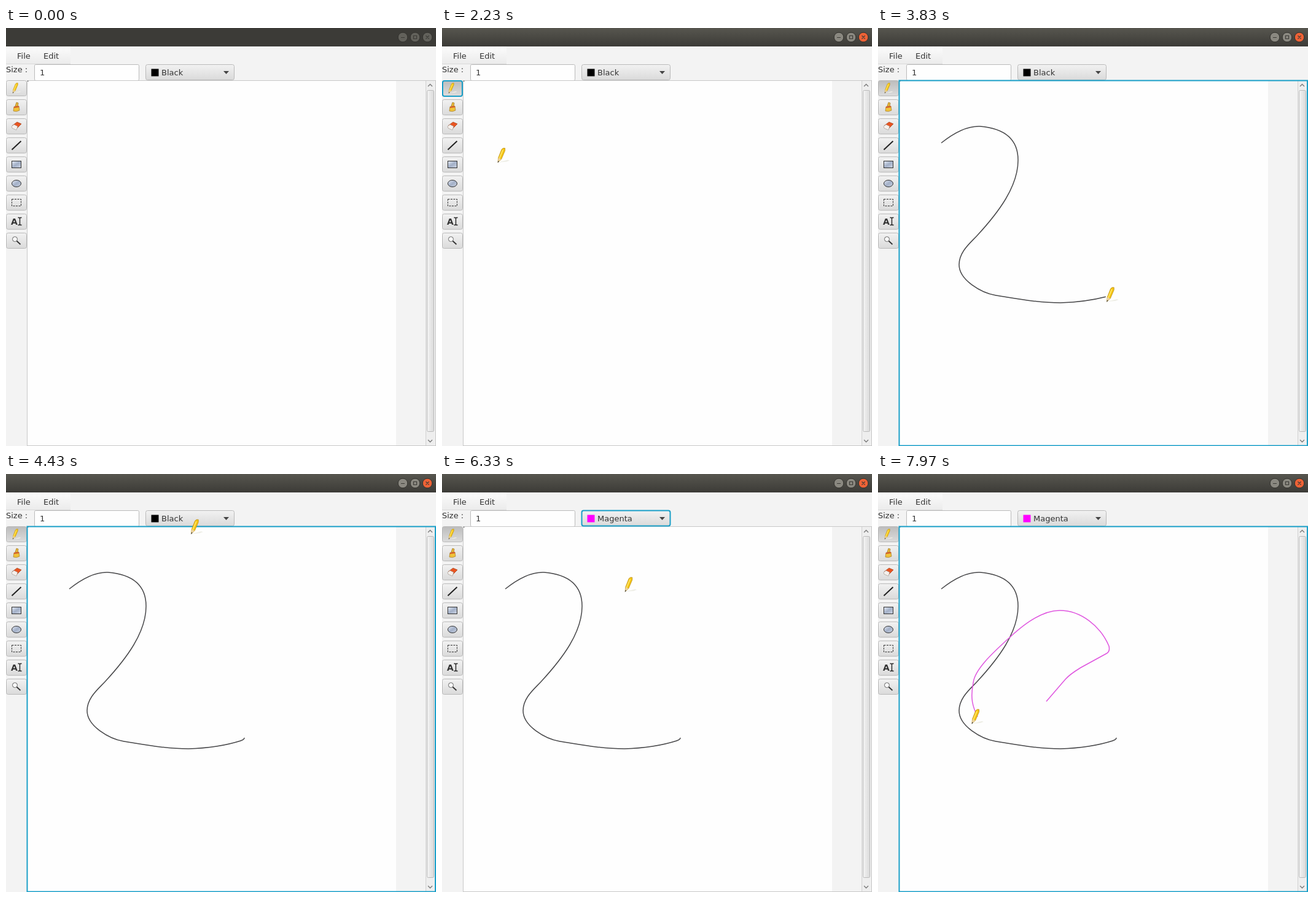
Recreate the animation shown at these times as an HTML page. Size 700 px wide and 680 px high, loop 8000 ms.

```html
<!DOCTYPE html>
<html lang="en">
<head>
<meta charset="utf-8">
<title>Paint window</title>
<style>
  html, body { margin: 0; width: 100%; height: 100%; overflow: hidden; background: #f3f3f3; }
  svg { display: block; width: 700px; height: 680px; }
  text { font: 13px "DejaVu Sans", sans-serif; fill: #333; }
  .edge { stroke: #bababa; }
  .ring { fill: none; stroke: #1a9fc8; stroke-width: 2; }
  .line { fill: none; stroke-width: 1.5; }
  .chrome circle { fill: #62615b; stroke: #33322e; }
  .chrome path { fill: none; stroke: #3c3b37; stroke-width: 1.2; }
  .active circle { fill: #8a8880; }
  .active .close { fill: #ee6236; }
</style>
</head>
<body>
<svg viewBox="0 0 700 680">
  <defs>
    <linearGradient id="titleOn" x2="0" y2="1"><stop stop-color="#57564f"/><stop offset="1" stop-color="#3c3b37"/></linearGradient>
    <linearGradient id="menu" x2="0" y2="1"><stop stop-color="#fbfbfb"/><stop offset="1" stop-color="#ebebeb"/></linearGradient>
    <linearGradient id="button" x2="0" y2="1"><stop stop-color="#f2f2f2"/><stop offset="1" stop-color="#dadada"/></linearGradient>
    <linearGradient id="hover" x2="0" y2="1"><stop stop-color="#fbfbfb"/><stop offset="1" stop-color="#e8e8e8"/></linearGradient>
    <linearGradient id="pressed" x2="0" y2="1"><stop stop-color="#bcbcbc"/><stop offset="1" stop-color="#dcdcdc"/></linearGradient>
    <linearGradient id="panel" x2="0" y2="1"><stop stop-color="#f6f6f6"/><stop offset=".8" stop-color="#efefef"/><stop offset="1" stop-color="#dcdcdc"/></linearGradient>
    <linearGradient id="thumb"><stop stop-color="#f4f4f4"/><stop offset="1" stop-color="#dadada"/></linearGradient>
    <linearGradient id="steel" x2="1" y2="1"><stop stop-color="#e4eaf4"/><stop offset=".5" stop-color="#a3b0c8"/><stop offset="1" stop-color="#ccd4e2"/></linearGradient>
    <filter id="shadow" x="-20%" y="-20%" width="140%" height="140%"><feDropShadow dx="0" dy="3" stdDeviation="5" flood-opacity=".4"/></filter>
    <g id="pencil">
      <path d="M-8 11L7 7L10 8L5 10Z" fill="#eeeee6"/>
      <path d="M-3-10Q-1-13 2.500-12V-8L-3.500 6L-9 11L-8.500 4Z" fill="#f6c614" stroke="#b98c16" stroke-width=".8"/>
      <path d="M-1-9L-7 5" stroke="#ffe66a" stroke-width="1.600"/>
      <path d="M-8.500 4L-3.500 6L-9 11Z" fill="#ead2a2"/>
      <path d="M-8.800 8.500L-7 9.500L-9.500 12Z" fill="#444"/>
    </g>
    <path id="arrow" d="M0 0V16.500L4 13L6.800 19.500L9.600 18.200L6.800 12H12Z" fill="#fff" stroke="#111" stroke-width="1.300" stroke-linejoin="round"/>
  </defs>

  <rect width="700" height="680" fill="#f3f3f3"/>
  <rect id="titleBar" width="700" height="30"/>
  <g id="chrome" class="chrome">
    <circle cx="646" cy="15" r="7.800"/><circle cx="666" cy="15" r="7.800"/><circle class="close" cx="686" cy="15" r="7.800"/>
    <path d="M643 15.500h6M663.500 12.500h5v5h-5zM683.500 12.500l5 5m0-5l-5 5"/>
  </g>

  <rect y="30" width="105" height="29" fill="url(#menu)"/>
  <path d="M0 58.500H105" stroke="#d9d9d9"/>
  <text x="18" y="50">File</text><text x="61" y="50">Edit</text>
  <text x="0" y="72">Size :</text>
  <rect class="edge" x="46.500" y="59.500" width="170" height="26" rx="2" fill="#fefefe"/>
  <text x="55" y="77">1</text>

  <rect x="34.500" y="85.500" width="665" height="594" fill="#f3f3f3" stroke="#c8c8c8"/>
  <rect x="35" y="86" width="600" height="593" fill="#fefefe"/>
  <path d="M35 86.500h1.500" stroke="#444"/>
  <rect x="683" y="86" width="16" height="593" fill="#eee"/>
  <path d="M683.500 86V679" stroke="#d2d2d2"/>
  <rect class="edge" x="685.500" y="101.500" width="11" height="555" rx="2" fill="url(#thumb)"/>
  <path d="M687 95l3.500-3.500l3.500 3.500M687 670l3.500 3.500l3.500-3.500" fill="none" stroke="#777" stroke-width="1.300"/>

  <rect class="edge" x="227.500" y="59.500" width="144" height="25" rx="3" fill="url(#button)"/>
  <rect id="chip" x="236.500" y="66.500" width="12" height="12"/>
  <text id="colorName" x="253" y="77"></text>
  <path d="M354 70h9l-4.500 5z" fill="#444"/>

  <g id="tools"></g>
  <use href="#pencil" transform="translate(17.500 98) scale(.7)"/>
  <path d="M17 121l3 1l-1 6l-4-1z" fill="#e9b637" stroke="#9a7420" stroke-width=".7"/>
  <path d="M13 128l8-1l1 7q-5 3-10 1z" fill="#f0c23a" stroke="#a27a26" stroke-width=".7"/>
  <path d="M13 128l8-1v2l-8 1z" fill="#d5562a"/>
  <path d="M10 159l8-6l7 3l-8 8z" fill="#ea5420" stroke="#9c3a14" stroke-width=".7"/>
  <path d="M9 160l4-3l6 3l-2 6l-7-3z" fill="#f4f0ec" stroke="#9a9088" stroke-width=".6"/>
  <path d="M9.500 198L24.500 184" stroke="#222" stroke-width="2"/>
  <rect x="9.500" y="216.500" width="15" height="11" fill="url(#steel)" stroke="#333"/>
  <ellipse cx="17" cy="253" rx="7.500" ry="5.500" fill="url(#steel)" stroke="#333"/>
  <rect x="9.500" y="278.500" width="15" height="11" fill="none" stroke="#333" stroke-dasharray="3 1.500"/>
  <text x="8" y="320" style="font-weight:bold;font-size:14px">A</text>
  <path d="M19.500 308.500h2l1 1l1-1h2M19.500 320.500h2l1-1l1 1h2M22.500 309V320" fill="none" stroke="#222" stroke-width="1.400"/>
  <circle cx="14.500" cy="343.500" r="4" fill="#f8f8f8" stroke="#666"/>
  <path d="M17.500 346.500L23.500 352" stroke="#333" stroke-width="1.800"/>

  <path id="blackLine" class="line" stroke="#48484a" d="M103 187C123 171 144 159 166 160C190 162 228 170 228 215C228 258 196 300 162 337C150 350 132 364 132 385C132 410 168 431 192 435C225 440 260 447 297 447C330 446 360 441 382 434Q388 432 388 429"/>
  <path id="magentaLine" class="line" stroke="#df55df" d="M274 370L305 334Q312 326 330 315L372 292Q378 289 376 280C362 247 330 222 296 222C262 222 228 253 212 268C188 290 157 318 155 340C150 365 154 378 162 395"/>

  <rect id="toolRing" class="ring" x="1" y="86" width="32" height="25" rx="3"/>
  <rect id="paneRing" class="ring" x="34.500" y="85.500" width="664.500" height="594"/>
  <rect id="comboRing" class="ring" x="227.500" y="59.500" width="144" height="25" rx="3"/>

  <g id="popup">
    <rect x="227.500" y="86.500" width="218" height="262" rx="4" fill="url(#panel)" stroke="#c4c4c4" filter="url(#shadow)"/>
    <g id="swatches"></g>
    <path d="M241 298.500H433" stroke="#d0d0d0"/>
    <text x="286" y="329" text-decoration="underline">Custom Color...</text>
    <rect id="pick" width="24" height="25" stroke="#1589b4" stroke-width="2"/>
  </g>
  <use id="cursor"/>
</svg>

<script>
const $ = id => document.getElementById(id);
const show = (id, on) => $(id).style.display = on ? "" : "none";
const clamp = u => Math.max(0, Math.min(1, u));
const smooth = u => u * u * (3 - 2 * u);

const LOOP = 8000;
const TOOL_CLICK = 1450, POPUP_OPEN = 5200, COLOR_CLICK = 6200;
const BLACK_PRESS = 2600, COMBO_PRESS = 5120, MAGENTA_PRESS = 7250;
const LINE_LAG = 12;

function addRect(parent, attrs) {
  const rect = document.createElementNS("http://www.w3.org/2000/svg", "rect");
  for (const name in attrs) rect.setAttribute(name, attrs[name]);
  return $(parent).appendChild(rect);
}

const buttons = Array.from({ length: 9 }, (_, i) => addRect("tools", {
  class: "edge", x: .5, y: 85.5 + 31 * i, width: 33, height: 25, rx: 3
}));

// Palette: pure hues, a grey ramp, then dark hues lightened by a tenth per row.
const pure = "cyan teal blue navy magenta purple red maroon yellow olive green lime".split(" ");
const greys = pure.map((_, i) => {
  const v = Math.round(255 - 25.5 * (i > 1 ? i - 1 : i / 2));
  return `rgb(${v},${v},${v})`;
});
const darkHues = "022 015 104 202 301 600 620 630 640 660 440 020".split(" ");
const lighten = (hue, step) => `rgb(${[...hue].map(d => Math.min(255, Math.round(25.5 * (+d + step))))})`;
const tints = Array.from({ length: 9 }, (_, step) => darkHues.map(hue => lighten(hue, step)));
const palette = [pure, greys, ...tints];

const swatchX = col => 241 + 16 * col;
const swatchY = row => row ? 111 + 16 * row : 99;
palette.forEach((line, row) => line.forEach((fill, col) =>
  addRect("swatches", { x: swatchX(col) + .5, y: swatchY(row) + .5, width: 15, height: 15, fill })));

// Each action takes the pointer position left by the one before and returns its own.
const glide = (start, duration, x, y) => (from, t) => {
  const u = smooth(clamp((t - start) / duration));
  return { x: from.x + (x - from.x) * u, y: from.y + (y - from.y) * u };
};

function trace(id, start, duration, ease) {
  const path = $(id), length = path.getTotalLength();
  return (from, t) => {
    const u = clamp((t - start) / duration);
    const reached = ease(u) * length;
    const drawn = t > start + duration ? length : Math.max(0, reached - LINE_LAG);
    show(id, drawn > 0);
    path.setAttribute("stroke-dasharray", `${drawn} ${length + 10}`);
    return u > 0 ? path.getPointAtLength(reached) : from;
  };
}

const actions = [
  glide(1130, 100, 6, 104),
  glide(1600, 600, 100, 208),
  glide(2200, 350, 103, 187),
  trace("blackLine", BLACK_PRESS, 1300, u => 1 - (1 - u) ** 1.47),
  glide(4180, 288, 307, 70),
  glide(5500, 350, 314, 105),
  glide(COLOR_CLICK, 400, 287, 404),
  glide(6600, 350, 274, 370),
  trace("magentaLine", MAGENTA_PRESS, 720, u => u ** 1.5)
];

function render(t) {
  const { x, y } = actions.reduce((from, action) => action(from, t), { x: -14, y: 112 });
  const selected = t >= TOOL_CLICK;
  const magenta = t >= COLOR_CLICK;
  const popupOpen = t >= POPUP_OPEN && !magenta;

  $("titleBar").setAttribute("fill", selected ? "url(#titleOn)" : "#3c3b37");
  $("chrome").classList.toggle("active", selected);
  buttons.forEach((button, i) => {
    const top = 85 + 31 * i;
    const over = x >= 0 && x < 34 && y >= top && y < top + 26;
    const look = selected && !i ? "pressed" : over ? "hover" : "button";
    button.setAttribute("fill", `url(#${look})`);
  });

  const focus = t >= MAGENTA_PRESS ? "paneRing" : t >= COMBO_PRESS ? "comboRing"
    : t >= BLACK_PRESS ? "paneRing" : selected ? "toolRing" : "";
  for (const id of ["toolRing", "paneRing", "comboRing"]) show(id, id === focus);

  $("chip").setAttribute("fill", magenta ? "magenta" : "black");
  $("colorName").textContent = magenta ? "Magenta" : "Black";

  show("popup", popupOpen);
  const hoverRow = palette.findIndex((_, r) => y >= swatchY(r) && y < swatchY(r) + 16);
  const hoverCol = Math.floor((x - swatchX(0)) / 16);
  const hovering = hoverRow >= 0 && hoverCol >= 0 && hoverCol < 12;
  const [row, col] = hovering ? [hoverRow, hoverCol] : [1, 11];
  $("pick").setAttribute("x", swatchX(col) - 4);
  $("pick").setAttribute("y", swatchY(row) - 1);
  $("pick").setAttribute("fill", palette[row][col]);

  const usePencil = selected && !popupOpen && x > 34 && y > 85;
  $("cursor").setAttribute("href", usePencil ? "#pencil" : "#arrow");
  $("cursor").setAttribute("transform", `translate(${x} ${y})`);
}

const began = performance.now();
function tick() {
  render((performance.now() - began) % LOOP);
  requestAnimationFrame(tick);
}
tick();
</script>
</body>
</html>
```
